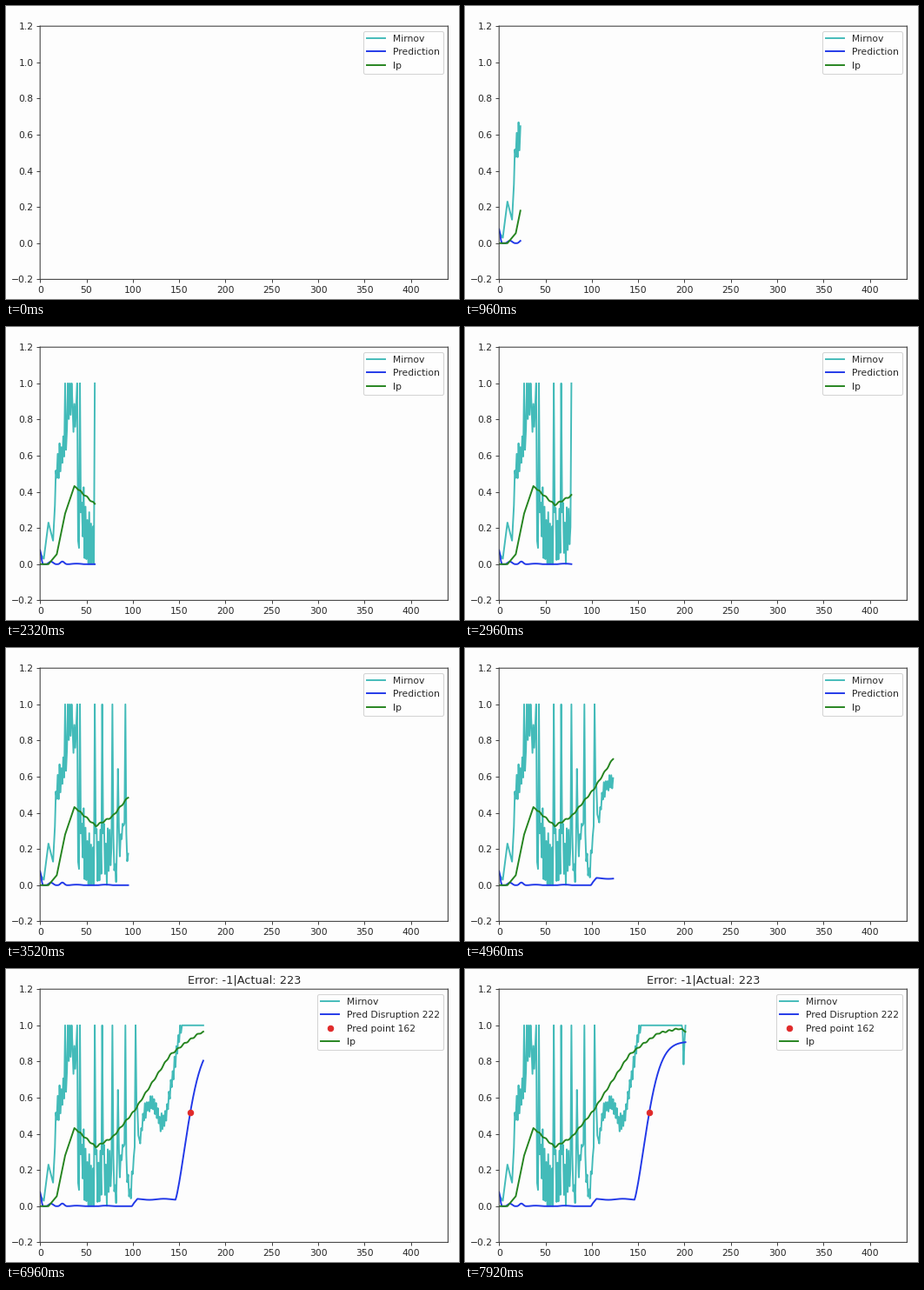
These frames come from a looping animation (521 by 337 pixels, 8 s). A matplotlib script:

```python
import numpy as np
import matplotlib.pyplot as plt
from matplotlib.animation import FuncAnimation

W, H, DPI = 521, 337, 77
FRAMES, INTERVAL = 100, 80
HIT = 162
PAPER, INK = "#fdfdfd", "#262626"

steps = np.arange(202)
rng = np.random.default_rng(4)


def through(*points):
    """Straight segments through a few (x, y) key points."""
    return np.interp(steps, *zip(*points))


def bump(height, center, width):
    return height * np.exp(-((steps - center) / width) ** 2)


def mirnov_signal():
    """Noisy trend with saturating bursts that decay quickly."""
    trend = through((0, .06), (4, .03), (9, .23), (14, .13), (18, .52),
                    (26, .66), (40, .85), (41, .13), (44, .27), (57, .1),
                    (76, .18), (82, .05), (90, .35), (97, .05), (101, .25),
                    (104, .6), (107, .33), (112, .52), (122, .58),
                    (130, .46), (136, .49), (152, 1), (156, 1.2))
    swing = np.select([steps < 17, steps < 41, steps < 77, steps < 101],
                      [0, .1, .2, .06], .05)
    zigzag = np.where(steps % 2, 1, -1) * rng.uniform(.3, 1, steps.size)
    signal = trend + swing * zigzag + bump(.55, 84, .8)
    for start in (27, 30, 32, 34, 40, 43, 59, 67, 78, 92, 103):
        age = steps - start
        burst = np.where(age >= 0, np.exp(-np.abs(age) / .8), 0)
        signal = np.maximum(signal, burst)
    signal[41] = .13
    return np.clip(signal, -.04, 1) - bump(.23, 199.2, .8)


def prediction_signal():
    """Quiet near zero, one dip, then a saturating rise."""
    quiet = (bump(.078, 0, 1.8) - bump(.016, 4.5, 2.5) + bump(.012, 12, 3)
             + bump(.018, 24, 3) - bump(.085, 97.5, 1.3)
             + .038 * np.clip((steps - 99) / 6, 0, 1)
             + .003 * np.sin(steps / 5))
    rise = .91 * (1 - np.exp(-(np.maximum(steps - 143, 0) / 21) ** 1.7))
    return np.maximum(quiet, rise)


def current_signal():
    ripple = .004 * np.sin(steps * .9) * (steps > 40)
    return ripple + through((0, 0), (9, 0), (18, .055), (27, .28), (37, .432),
                            (60, .328), (78, .38), (102, .53), (123, .7),
                            (140, .835), (156, .9), (172, .957), (194, .982),
                            (201, .968))


plt.rcParams.update({
    "font.family": "DejaVu Sans", "font.size": 10, "text.color": INK,
    "axes.edgecolor": "#404040", "axes.linewidth": 1, "lines.linewidth": 1.8,
    "xtick.color": INK, "ytick.color": INK})
fig = plt.figure(figsize=(W / DPI + 1e-6, H / DPI + 1e-6), dpi=DPI,
                 facecolor=PAPER)
ax = fig.add_axes([39.2 / W, 1 - 314.4 / H, 469.2 / W, 291.2 / H],
                  facecolor=PAPER)
ax.set(xlim=(0, 440), ylim=(-.2, 1.2), xticks=range(0, 401, 50))
ax.set_yticks(np.linspace(-.2, 1.2, 8))
for spine in ax.spines.values():
    spine.set_snap(False)

mirnov_line, = ax.plot([], [], color="#43bbb9", label="Mirnov")
pred_line, = ax.plot([], [], color="#2138e8")
dot, = ax.plot([], [], "o", color="#e02a2a", ms=6, label=f"Pred point {HIT}")
ip_line, = ax.plot([], [], color="#25841f", label="Ip")

prediction = prediction_signal()
series = [(mirnov_line, mirnov_signal()), (pred_line, prediction),
          (ip_line, current_signal())]


def samples_shown(frame):
    """About two samples per frame; the stream's pace varies a little."""
    return round(np.interp(frame, [0, 21, 37, 44, 62, 77, 99],
                           [0, 42, 79, 96, 124, 157, 202]))


def draw(frame):
    count = samples_shown(frame)
    for line, values in series:
        line.set_data(steps[:count], values[:count])

    found = count > HIT
    dot.set_data([HIT] if found else [], [prediction[HIT]] if found else [])
    pred_line.set_label("Pred Disruption 222" if found else "Prediction")
    ax.set_title("Error: -1|Actual: 223" if found else "")
    handles = [mirnov_line, pred_line] + [dot] * found + [ip_line]
    ax.legend(handles=handles, loc="upper right")
    return []


anim = FuncAnimation(fig, draw, frames=FRAMES, interval=INTERVAL,
                     repeat=True, repeat_delay=0, blit=False)
plt.show()
```
